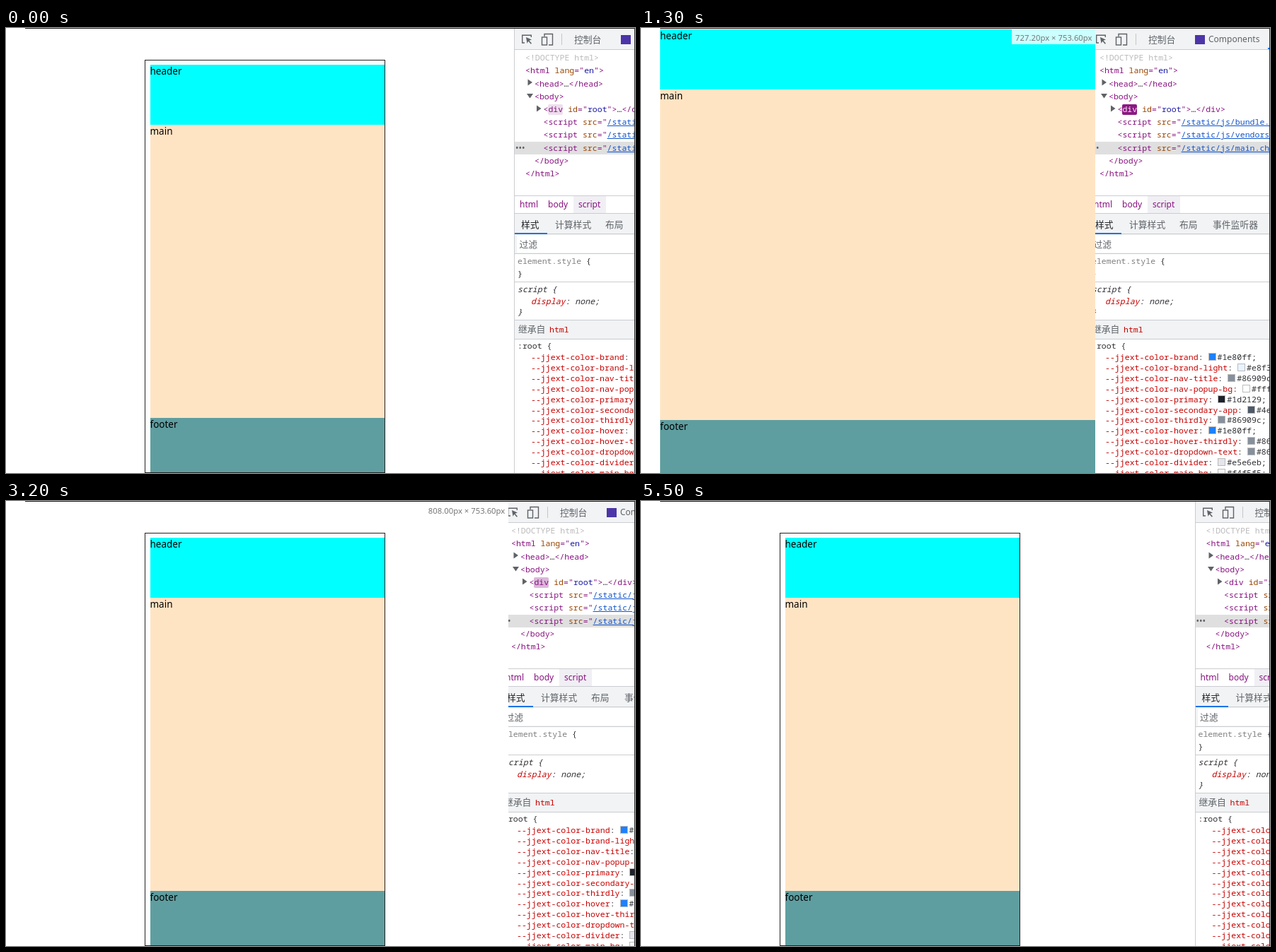
An HTML page that plays this animation: 889x630 px, repeating every 6.2 s.

```html
<!DOCTYPE html>
<html lang="zh">
<head>
<meta charset="utf-8">
<style>
html, body { margin: 0; width: 100%; height: 100%; overflow: hidden; background: #fff; }
#stage { position: absolute; left: 0; top: 0; width: 889px; height: 630px; overflow: hidden; }
#stage div, #stage p, #stage svg { position: absolute; margin: 0; }
p { white-space: pre; line-height: 18px; height: 18px; }
.ui { font: 12px/18px "Noto Sans", "Noto Sans CJK SC", "Noto Sans CJK", sans-serif; color: #5f6368; }
.cn { font-size: 12.8px; }
.mono { font: 11.55px/18px "Noto Sans Mono", monospace; color: #303135; }
.tag { color: #881280; }
.attr { color: #994500; }
.val { color: #1a1aa6; }
.link { color: #1155cc; text-decoration: underline; }
.pale { color: #bbb; }
.gray { color: #808080; }
.prop { color: #c80000; }
.it { font-style: italic; }
.sw { display: inline-block; width: 9px; height: 9px; border: 1px solid #bbb; margin-right: 2px; vertical-align: -1px; }
#panel { top: 0; width: 889px; height: 630px; background: #fff; overflow: hidden; }
#edge { left: 0; top: 0; width: 1px; height: 630px; background: #cacdd1; }
#view { left: 0; top: 0; height: 630px; background: #fff; overflow: hidden; }
#view p { font: 13.5px/18px "Noto Sans", sans-serif; color: #000; }
#box { border: 1px solid #222; box-sizing: border-box; }
#tip { top: 1px; right: 0; width: 118px; height: 22px; background: rgba(255,255,255,.8); }
#tip p { right: 4.5px; top: 3.5px; font: 11.3px/18px "Noto Sans", sans-serif; color: #777; }
#flash { border-radius: 2px; width: 21px; height: 15px; left: 48px; top: 107.5px; }
</style>
</head>
<body>
<div id="stage">
  <div id="panel"></div>
  <div id="view">
    <div id="box"></div>
    <div id="header" style="background:#0ff"><p>header</p></div>
    <div id="main" style="background:#ffe4c4"><p>main</p></div>
    <div id="footer" style="background:#5f9ea0"><p>footer</p></div>
    <div id="tip"><p></p></div>
  </div>
  <div style="left:27px;top:0;width:862px;height:1px;background:#222"></div>
  <div style="left:888px;top:0;width:1px;height:630px;background:#333"></div>
</div>
<script>
const LOOP = 6200, STEP = 100, LEFT = 27;
const $ = id => document.getElementById(id);

// [ms, divider x]
const DIVIDER = [[0, 718], [950, 718], [1000, 698], [1200, 652], [1400, 612], [1600, 588], [1700, 588],
  [1800, 601], [1900, 621], [2100, 672], [2250, 723], [2300, 727], [2500, 737.5], [2600, 745.5], [2800, 755],
  [3000, 745], [3200, 698], [3400, 632], [3550, 601], [3650, 601], [3800, 612], [4000, 652],
  [4250, 705.5], [4300, 705.5], [4350, 730], [4600, 756], [4900, 780], [5000, 782.5], [6200, 782.5]];
// [ms, strength of the node highlight]
const FLASH = [[0, .14], [300, 0], [1200, 0], [1250, 1], [1600, .8], [1900, .52], [2200, .3], [2250, 1], [2600, .65],
  [3200, .3], [3300, 1], [3600, .8], [4100, .6], [4200, 1], [4300, 1], [5100, .3], [5300, .25], [5400, .1], [5500, 0], [6200, 0]];

function at(keys, t) {
  const i = Math.max(1, keys.findIndex(k => k[0] >= t));
  const [t0, a] = keys[i - 1], [t1, b] = keys[i];
  return a + (b - a) * Math.max(0, t - t0) / (t1 - t0);
}

const span = (cls, s) => `<span class="${cls}">${s}</span>`;
const text = (x, y, html, cls = 'mono') => `<p class="${cls}" style="left:${x}px;top:${y - 9}px">${html}</p>`;
const rect = (x, y, w, h, color) => `<div style="left:${x}px;top:${y}px;width:${w}px;height:${h}px;background:${color}"></div>`;
const line = y => rect(0, y, 889, 1, '#cacdd1');
const tag = s => span('tag', `&lt;${s}&gt;`);
const attr = (name, cls, value) => span('tag', ' ' + span('attr', name) + '="' + span(cls, value));
const script = file => span('tag', '&lt;script') + attr('src', 'link', '/static/js/' + file);
const END = span('tag', '"&gt;') + tag('/script');
const DOTS = y => text(2, y, '•••', 'ui" data-dots="');

function toolbar() {
  return rect(0, 1, 889, 29, '#f1f3f4') + line(30) +
    `<svg width="80" height="30" fill="none" stroke="#5f6368" stroke-width="1.4">
      <path d="M15 21h-3.300V10.200h12.600V13"/><path d="M17 13l8 3.500-3.500 1.200 3.500 4-1.200 1-3.500-4-1.800 3z" fill="#5f6368" stroke="none"/>
      <path d="M43 12V8.500h11.500v15.500H49"/><rect x="39.500" y="13" width="7" height="11"/>
      <path d="M67.500 8v16" stroke="#c4c7cb" stroke-width="1"/></svg>` +
    text(85, 16, '控制台', 'ui cn') + rect(151, 10, 14, 13, '#4c35a8') + text(170, 16, 'Components', 'ui') +
    text(266, 16, '元素', 'ui cn') + rect(254, 28, 48, 2, '#1a73e8');
}

function tree() {
  return text(16, 42, span('pale', '&lt;!DOCTYPE html&gt;')) +
    text(16, 60, span('tag', '&lt;html') + attr('lang', 'val', 'en') + span('tag', '"&gt;')) +
    text(29, 78.5, tag('head') + '…' + tag('/head')) + text(29, 97, tag('body')) +
    '<div id="flash"></div>' +
    text(41.500, 115, span('tag', '&lt;<span id="node">div</span>') + attr('id', 'val', 'root') + span('tag', '"&gt;') + '…' + tag('/div')) +
    `<svg width="60" height="130" fill="#606266"><path d="M19.500 72.500v9l6.500-4.500zM18 93h9l-4.500 6.500zM32 109.500v9l6.500-4.500z"/></svg>`;
}

function crumbs(y) {
  return line(y) + rect(0, y + 1, 889, 24, '#fff') + rect(84, y + 1, 46, 24, '#f0eff4') +
    [[8, 'html'], [48, 'body'], [91, 'script']].map(([x, s]) => text(x, y + 13, s, 'ui tag')).join('');
}

const treeEnd = (a, b) => text(29, a, tag('/body')) + text(16, b, tag('/html'));

function sideLayout() {
  const last = span('gray it', ' == $0');
  return rect(1, 196, 888, 35, '#dfdfdf') + DOTS(204) +
    text(41, 133, script('bundle.js') + span('tag', '"&gt;')) + text(41, 151, tag('/script')) +
    text(41, 169, script('vendors~main.')) + text(41, 186, span('link', 'chunk.js') + END) +
    text(41, 204, script('main.chunk.j')) + text(41, 222, span('link', 's') + END + last) +
    treeEnd(240, 258) + crumbs(615);
}

const VARS = [['brand', '1e80ff'], ['brand-light', 'e8f3ff'], ['nav-title', '86909c'], ['nav-popup-bg', 'ffffff'],
  ['primary', '1d2129'], ['secondary-app', '4e5969'], ['thirdly', '86909c'], ['hover', '1e80ff'],
  ['hover-thirdly', '86909c'], ['dropdown-text', '86909c'], ['divider', 'e5e6eb'], ['main-bg', 'f4f5f5']];

function vars(wrapped) {
  return VARS.map(([name, hex], i) => {
    const key = span('prop', '--jjext-color-' + name);
    const value = `<span class="sw" style="background:#${hex}"></span>#${hex};`;
    const y = 466 + i * 14.9 * (wrapped ? 2 : 1);
    if (!wrapped) return text(24, y, key + ': ' + value);
    const long = name.length > 12;
    return text(24, y, key + (long ? '' : ':')) + text(45.5, y + 14.9, (long ? ': ' : '') + value);
  }).join('');
}

function stackLayout() {
  return rect(1, 161, 888, 18, '#dfdfdf') + DOTS(170) +
    ['bundle.js', 'vendors~main.chunk.js', 'main.chunk.js'].map((f, i) => text(41.5, 133 + i * 18.4, script(f) + END)).join('') +
    treeEnd(188, 206) + crumbs(237) +
    line(262) + rect(0, 263, 889, 28, '#f1f3f4') + line(291) + rect(0, 290, 47, 2, '#1a73e8') +
    [[10, '样式'], [58, '计算样式'], [129, '布局'], [176, '事件监听器'], [260, 'DOM 断点']]
      .map(([x, s], i) => text(x, 277.5, s, i ? 'ui cn' : 'ui cn" style="color:#202124;')).join('')
      .replace('color:#202124;" style="', 'color:#202124;') +
    rect(0, 292, 889, 27, '#f1f3f4') + rect(4, 293, 885, 25, '#fff') + text(7.5, 306, '过滤', 'ui cn') + line(319) +
    text(5, 330, span('gray', 'element.style') + ' {') + text(5, 348, '}') + line(359) +
    text(5, 370, 'script {', 'mono it') + text(24, 387, span('prop', 'display') + ': none;', 'mono it') +
    text(5, 402, '}', 'mono it') + line(413) +
    rect(0, 414, 889, 26, '#f1f3f4') + text(6, 425.5, '继承自', 'ui cn') + text(50, 427, 'html', 'mono prop') + line(440) +
    text(5, 450, ':root {') + `<div id="inline">${vars(false)}</div><div id="wrapped">${vars(true)}</div>`;
}

$('panel').innerHTML = `<div id="side">${sideLayout()}</div><div id="stack">${stackLayout()}</div>` +
  toolbar() + tree() + '<div id="edge"></div>';

const show = (id, on) => $(id).style.display = on ? 'block' : 'none';
function place(id, x, y, w, h) {
  Object.assign($(id).style, { left: x + 'px', top: y + 'px', width: w + 'px', height: h + 'px' });
}
const mix = (a, b, k) => a.map((v, i) => Math.round(v + (b[i] - v) * k));
const PURPLE = [136, 18, 128], WHITE = [255, 255, 255];

function page(edge) {
  const css = (edge - LEFT) * 1.183;
  const narrow = css > 768;
  $('view').style.width = edge + 'px';
  show('box', narrow);
  place('box', 196, 44.5, 340, 585.5);
  const x = narrow ? 203.5 : LEFT, w = narrow ? 331.5 : edge - LEFT;
  const ys = narrow ? [52, 136.5, 551.5, 629] : [1.5, 86.5, 555, 630];
  ['header', 'main', 'footer'].forEach((id, i) => place(id, x, ys[i], w, ys[i + 1] - ys[i]));
  $('tip').firstChild.textContent = `${(Math.round(css / .8) * .8).toFixed(2)}px × 753.60px`;
}

function draw(t) {
  const x = at(DIVIDER, t);
  const side = x < 612;
  const wrapped = x < 660 && x > at(DIVIDER, Math.max(0, t - STEP));
  $('panel').style.left = x + 'px';
  show('side', side);
  show('stack', !side);
  show('wrapped', wrapped);
  show('inline', !wrapped);

  // The page view follows the divider half a step late
  page(t === 1000 ? 718 : at(DIVIDER, Math.max(0, t - STEP / 2)));
  show('tip', t > 1000 && t < 5100);

  const a = at(FLASH, t);
  $('flash').style.background = `rgba(${PURPLE},${a})`;
  $('node').style.color = `rgb(${mix(PURPLE, WHITE, Math.max(0, (a - .45) * 1.75))})`;
}

function tick() {
  const t = performance.now() % LOOP;
  draw(Math.floor(t / STEP) * STEP);
  requestAnimationFrame(tick);
}
tick();
</script>
</body>
</html>
```
